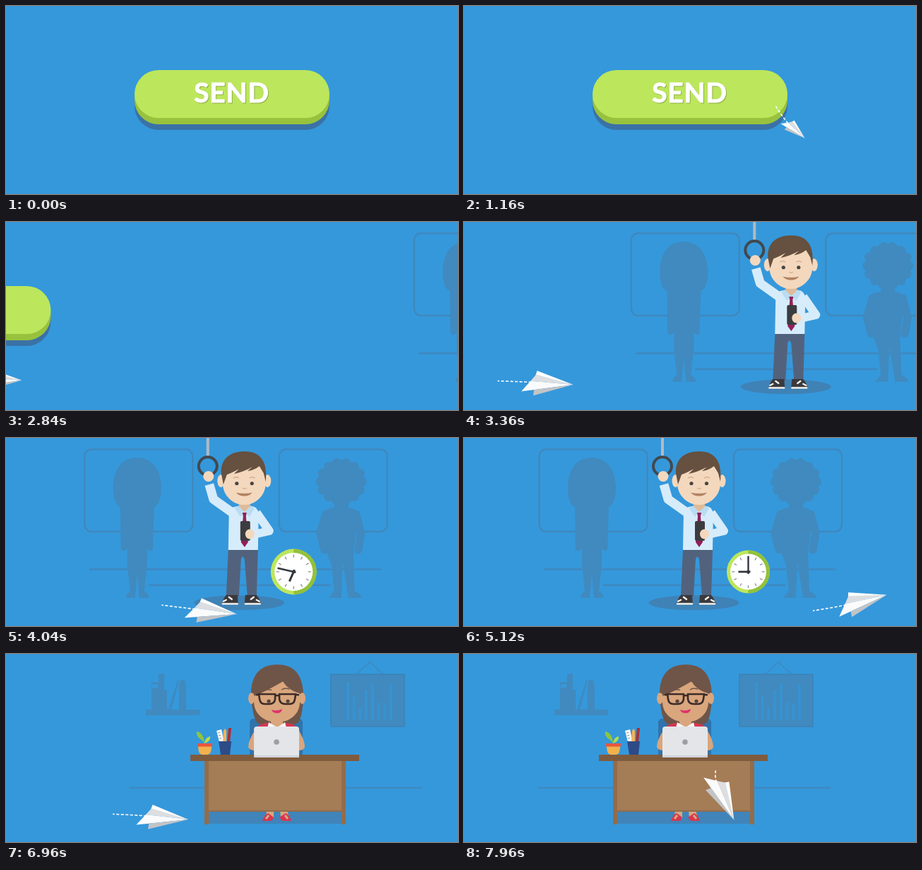
These frames come from a looping animation (640x267 px, 8000 ms). An HTML page:

```html
<!DOCTYPE html>
<html lang="en">
<head>
<meta charset="utf-8">
<title>Send</title>
<style>
  html, body { margin: 0; width: 100%; height: 100%; overflow: hidden; background: #3598db; }
  svg { display: block; width: 640px; height: 267px; }
  .back { fill: #408abf; }
  .limb { fill: none; stroke: #408abf; stroke-width: 11; stroke-linecap: round; stroke-linejoin: round; }
  .line { fill: none; stroke: #3f88be; stroke-width: 2.4; stroke-linecap: round; }
  .skin { fill: #f4d8bd; }
  .tan { fill: #d9a67d; }
  .label { font: 700 39px Lato, sans-serif; letter-spacing: .8px; text-anchor: middle;
    stroke-width: .9; stroke-linejoin: round; }
</style>
</head>
<body>
<svg viewBox="0 0 640 267">
  <defs>
    <path id="leave" d="M440 140C470 190 520 229 600 241S720 225 800 190"/>
    <path id="pass" d="M-160 215C-20 226 60 224 155 231S330 255 400 254S560 235 598 223S740 170 780 150"/>
    <path id="arrive" d="M-160 226C-60 226 120 220 258 235S458 225 455 180S425 128 395 132S350 160 358 184S386 244 392 250"/>
  </defs>
  <rect width="640" height="267" fill="#3598db"/>

  <g id="send">
    <rect id="shade" x="182" y="100" width="276" height="76" rx="34" fill="#3a72a6"/>
    <rect id="side" x="182" y="94" width="276" height="74" rx="34" fill="#98c23d"/>
    <g id="face">
      <rect x="182" y="91" width="276" height="68" rx="34" fill="#bce65c"/>
      <text class="label" x="320.5" y="138" fill="#8fae45" stroke="#8fae45">SEND</text>
      <text class="label" x="319.5" y="136.5" fill="#fff" stroke="#fff">SEND</text>
    </g>
  </g>

  <g id="train">
    <g class="line">
      <rect x="106.500" y="16" width="153" height="117" rx="10"/>
      <rect x="382" y="16" width="153" height="117" rx="10"/>
      <path d="M114 186.500H525M198 209H454"/>
    </g>
    <path class="back" d="M181 28C157 28 148 47 147 68C147 84 149 94 157 98L158 158Q162 164 167 156L167 180L171 217Q164 224 165 227H178L181 192L184 227H198Q198 223 191 217L195 180V156Q200 164 203 158L205 98C213 94 215 84 215 68C214 47 204 28 181 28Z"/>
    <circle class="back" cx="470" cy="62" r="31"/>
    <g id="curls" class="back"></g>
    <path class="back" d="M460 88V99Q446 100 444 108L450 165L456 180L460 217L452 227H470L472 176L480 227H499Q497 221 489 217L487 165L494 108Q492 100 480 99V88Z"/>
    <path class="limb" d="M448 108L440 135L446 159M491 108L498 135L494 159"/>

    <ellipse cx="325.500" cy="234" rx="64" ry="10.500" fill="#3f82b6"/>
    <path d="M281 0V28" stroke="#b3bac0" stroke-width="4"/>
    <circle cx="281" cy="40" r="13" fill="none" stroke="#43484e" stroke-width="4"/>
    <path d="M310 159L307 225H325L328 172Q330 165 333 172L337 225H350L352 159Z" fill="#52627d"/>
    <path d="M307 223H323L324 236H301Q302 229 307 223ZM334 223H350Q356 230 356 236H333Z" fill="#3a3a3e"/>
    <path d="M302 235.500H323M334 235.500H355M303 232L307 230M350 230L354 232M311 226L315 229M346 226L342 229" stroke="#f3f0ea" stroke-width="2.400" stroke-linecap="round"/>
    <path d="M283 66L289 87L317 107" fill="none" stroke="#d6ecfa" stroke-width="13" stroke-linejoin="round"/>
    <ellipse class="skin" cx="282" cy="54.500" rx="7.500" ry="7.500"/>
    <path d="M311 103Q316 97 323 97H343Q350 97 353 106L352 159H310Z" fill="#d6ecfa"/>
    <path d="M325 90H341V101L333 108L325 101Z" fill="#e0bb99"/>
    <path d="M324 96L333 105L327 112L319 100ZM342 96L333 105L340 112L347 100Z" fill="#b9dcf3"/>
    <path d="M330 106H336L335 111L338 148L333 155L328 148L331 111Z" fill="#922059"/>
    <path d="M350 106L368 132L346 137" fill="none" stroke="#d6ecfa" stroke-width="12" stroke-linejoin="round"/>
    <rect x="327" y="118" width="14" height="28" rx="2" fill="#3c3c40"/>
    <ellipse class="skin" cx="340.500" cy="136.500" rx="6.500" ry="7"/>
    <g class="skin">
      <ellipse cx="299.500" cy="61" rx="5" ry="9"/>
      <ellipse cx="365.500" cy="61" rx="5" ry="9"/>
      <path d="M302 50Q302 24 332.500 24Q363 24 363 50V64C363 82 348 95 332.500 95S302 82 302 64Z"/>
    </g>
    <path d="M303 66L300 50C299 30 312 19 333 19C356 19 366 34 363 62L360 50L354 40Q346 46 337 47L344 41Q332 48 318 51L325 44Q314 50 308 52Z" fill="#66503f"/>
    <circle cx="322" cy="64.500" r="2.600" fill="#4a4642"/>
    <circle cx="343.500" cy="64.500" r="2.600" fill="#4a4642"/>
    <path d="M317 57Q321 54 325 57M340 57Q344 54 348 57M330 71Q333 73 336 71" fill="none" stroke="#d3ac8c" stroke-width="1.400"/>
    <path d="M321 77.500Q333 80 344 77.500Q340 82.500 333 82.500Q325 82.500 321 77.500Z" fill="#b08363"/>

    <g id="clock">
      <circle r="30.500" fill="#bce65c"/>
      <path d="M0-30.500A30.500 30.500 0 0 1 0 30.500Z" fill="#93c13a"/>
      <circle r="25.500" fill="#fff"/>
      <circle r="21" fill="none" stroke="#8b9096" stroke-width="4" pathLength="120" stroke-dasharray="1.200 8.800" stroke-dashoffset=".6"/>
      <path id="hour" d="M0 3V-14" stroke="#33373c" stroke-width="2.800"/>
      <path id="minute" d="M0 3V-22" stroke="#33373c" stroke-width="2.400"/>
      <circle r="2.200" fill="#33373c"/>
    </g>
  </g>

  <g id="office">
    <path class="line" d="M106 190H518"/>
    <path class="back" d="M128 79H204V87H128ZM136 40H146V79H136ZM146 28H154V79H146ZM154 51H158V79H154ZM160 79L173 37L175 38L164 79ZM175 50Q175 36 180 36Q185 36 185 50V79H175Z"/>
    <path d="M137 43H145V48H137Z" fill="#3598db"/>
    <path class="line" d="M426 29L445 11L464 29" style="stroke-width:1.500"/>
    <rect class="back" x="390" y="29" width="104" height="74" stroke="#3d81b4" stroke-width="1.500"/>
    <g id="bars" fill="#3892d1"></g>

    <rect x="217" y="222" width="188" height="19" fill="#4084b9"/>
    <rect x="275" y="92" width="75" height="56" rx="5" fill="#3173ad"/>
    <path d="M314 15C288 15 276 32 277 60Q279 90 286 98Q298 104 314 103Q331 104 343 98Q350 90 351 60C351 32 340 15 314 15Z" fill="#6f5547"/>
    <path class="tan" d="M284 106Q273 122 273 132Q274 137 284 137ZM343 106Q353 122 353 132Q352 137 343 137Z"/>
    <path d="M284 104Q292 98 302 98H325Q335 98 343 104V112H284Z" fill="#d8364f"/>
    <path class="tan" d="M305 90H322V99L314 105L305 99Z"/>
    <path d="M302 97L314 104L325 97L327 105H300Z" fill="#f6f6f6"/>
    <g class="tan">
      <ellipse cx="277.500" cy="63" rx="4.500" ry="8"/>
      <ellipse cx="349.500" cy="63" rx="4.500" ry="8"/>
      <path d="M281 60Q300 52 322 39Q330 52 346 56V68C346 86 331 97 314 97S281 86 281 68Z"/>
    </g>
    <path d="M290 55Q297 49 306 51M320 51Q325 47 331 50" fill="none" stroke="#6f5547" stroke-width="1.500"/>
    <circle cx="302" cy="67" r="2.600" fill="#5a4336"/>
    <circle cx="329" cy="67" r="2.600" fill="#5a4336"/>
    <path d="M288 57H311V64Q310 71 303 71H296Q290 71 289 64ZM317 57H340L339 64Q338 71 332 71H325Q318 71 317 64ZM311 59H317M284 58H288M340 58H345" fill="none" stroke="#3b2b29" stroke-width="2.600"/>
    <path d="M306 79Q313 82 321 78Q320 84 314 84Q307 84 306 79Z" fill="#df326e"/>

    <path class="tan" d="M299 222H309V233H298ZM318 222H328L331 233H319Z"/>
    <path d="M293 237Q296 228 301 226L309 232L306 237ZM334 237Q331 228 326 226L317 232L321 237Z" fill="#d8364f"/>
    <path d="M302 229L298 234M325 229L329 234" stroke="#d9a67d" stroke-width="3"/>
    <path d="M211 152H411V242H405V223H217V242H211Z" fill="#a47c56"/>
    <path d="M211 152H217V242H211ZM405 152H411V242H405ZM217 222H405V224H217Z" fill="#946c49"/>
    <rect x="191" y="143" width="239" height="9" fill="#7f5b3e"/>
    <rect x="281" y="103" width="64" height="44" rx="4" fill="#e4e5e9"/>
    <path d="M281 144H345V147H281Z" fill="#cfd2d7"/>
    <circle cx="313" cy="125" r="3.800" fill="#9b9fa6"/>

    <path d="M211 127Q208 122 204 120Q199 116 200 110Q210 112 211 127Z" fill="#8cc63f"/>
    <path d="M211 127Q212 118 219 117Q220 124 211 127Z" fill="#b4dd4e"/>
    <path d="M202 131H221Q221 143 215 143H208Q202 143 202 131Z" fill="#f3b14c"/>
    <rect x="201" y="127" width="21" height="4.500" fill="#e9573f"/>
    <path d="M228 109L235 107L239 125H232Z" fill="#f7f7f7"/>
    <path d="M230 112L233 111.400M231 116L234 115.400M232 120L235 119.400" stroke="#8d9298"/>
    <path d="M238 109L240 106L242 109V125H237Z" fill="#f0b55a"/>
    <path d="M245 105L249 105L247 125H243Z" fill="#a92f35"/>
    <path d="M231 124H249L247 143H234Z" fill="#2d4b87"/>
  </g>

  <path id="trail" fill="none" stroke="#fff" stroke-width="1.600" stroke-dasharray="4 2.500"/>
  <g id="plane">
    <path d="M10-15L58 11L6-7Z" fill="#fff"/>
    <path d="M8-10L58 11L-1-2Z" fill="#dcdee1"/>
    <path d="M-16 11L-1-2L58 11L2 11Z" fill="#fbfbfc"/>
    <path d="M2 11L58 11L0 19Z" fill="#c2c4c7"/>
  </g>
</svg>
<script>
const LOOP = 8000, SHIFT = 866, SCROLL = 1900;
const NOSE = Math.hypot(58, 11), TILT = Math.atan2(11, 58), TRAIL = 48;
const $ = id => document.getElementById(id);

// Each flight runs along its path at constant speed
const flights = [
  { id: 'leave', from: 1000, to: 3000 },
  { id: 'pass', from: 2356, to: 6121 },
  { id: 'arrive', from: 6157, to: 8132 }
];
for (const f of flights) f.length = $(f.id).getTotalLength();

const clamp = x => Math.max(0, Math.min(1, x));
const place = (id, value) => $(id).setAttribute('transform', value);
const slide = (id, x) => place(id, `translate(${x.toFixed(2)} 0)`);
const show = (id, on) => { $(id).style.display = on ? '' : 'none'; };

// cubic-bezier(.25, 0, .18, 1)
function ease(u) {
  let lo = 0, hi = 1;
  for (let i = 0; i < 24; i++) {
    const s = (lo + hi) / 2, r = 1 - s;
    if (3 * s * r * r * .25 + 3 * s * s * r * .18 + s ** 3 < u) lo = s;
    else hi = s;
  }
  return lo * lo * (3 - 2 * lo);
}

const scroll = (t, from) => SHIFT * ease(clamp((t - from) / SCROLL));

function backOut(u) {
  const w = u - 1;
  return 1 + 2.7 * w ** 3 + 1.7 * w ** 2;
}

function drawPlane(t) {
  const flight = flights.findLast(f => t >= f.from && t <= f.to);
  show('plane', flight);
  show('trail', flight);
  if (!flight) return;

  const at = d => $(flight.id).getPointAtLength(d);
  const dist = flight.length * (t - flight.from) / (flight.to - flight.from);
  const tail = at(dist), nose = at(dist + NOSE);
  const angle = (Math.atan2(nose.y - tail.y, nose.x - tail.x) - TILT) * 180 / Math.PI;
  const size = clamp((t - 1000) / 300);
  place('plane', `translate(${tail.x} ${tail.y}) rotate(${angle}) scale(${size})`);

  // The trail shortens where the path runs out
  const room = Math.max(0, Math.min(TRAIL, dist, flight.length - dist - NOSE));
  const points = Array.from({ length: 13 }, (_, i) => at(dist - room * i / 12));
  $('trail').setAttribute('d', 'M' + points.map(p => `${p.x} ${p.y}`).join('L'));
}

function draw(t) {
  const a = scroll(t, 2335), b = scroll(t, 5735);
  slide('send', -a);
  slide('train', SHIFT - a - b);
  slide('office', SHIFT - b);

  const press = t >= 400 && t < 760 ? 6 : 0;
  slide('face', 0);
  place('face', `translate(0 ${press})`);
  $('side').setAttribute('y', 94 + press);
  $('side').setAttribute('height', 74 - press);
  $('shade').setAttribute('height', press ? 72 : 76);

  place('clock', `translate(402.5 190) scale(${backOut(clamp((t - 3800) / 320))})`);
  show('clock', t > 3800);
  const left = (1 - clamp((t - 3900) / 1000)) ** 2;
  place('minute', `rotate(${-1080 * left})`);
  place('hour', `rotate(${-90 - 90 * left})`);

  drawPlane(t);
}

$('curls').innerHTML = Array.from({ length: 14 }, (_, i) => {
  const r = i * Math.PI / 7;
  return `<circle cx="${470 + 29 * Math.cos(r)}" cy="${62 + 27 * Math.sin(r)}" r="7"/>`;
}).join('');
$('bars').innerHTML = Array.from({ length: 8 }, (_, i) => {
  const top = 58 - 18 * Math.cos(i * 1.7);
  return `<rect x="${412 + i * 8.7}" y="${top}" width="4" height="${94 - top}"/>`;
}).join('');

const start = performance.now();
function tick(now) {
  draw(Math.max(0, now - start) % LOOP);
  requestAnimationFrame(tick);
}
draw(0);
requestAnimationFrame(tick);
</script>
</body>
</html>
```
